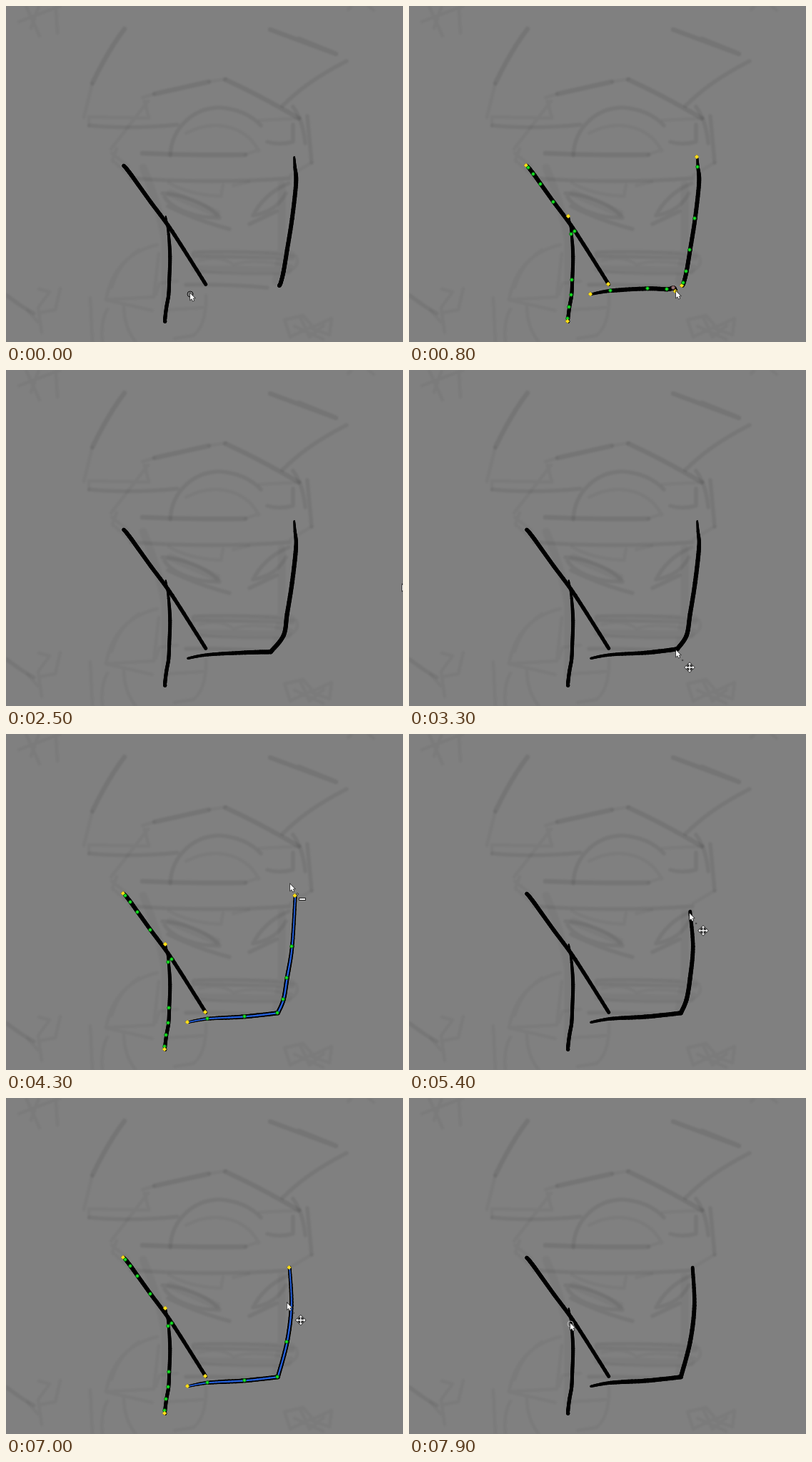
Recreate the animation shown at these times as an HTML page with a canvas. Size 556 by 470 pixels, loop 8000 ms.

```html
<!DOCTYPE html>
<html lang="en">
<head>
<meta charset="utf-8">
<title>Vector line editing</title>
<style>
  html, body { margin: 0; width: 100%; height: 100%; overflow: hidden; background: #808080; }
  svg, canvas { position: absolute; left: 0; top: 0; width: 556px; height: 470px; }
  svg { fill: none; stroke: #000; stroke-linecap: round; stroke-linejoin: round; filter: blur(1.2px); }
  .bold { stroke-width: 6.5; opacity: .085; }
  .mid { stroke-width: 5.5; opacity: .07; }
  .thin { stroke-width: 4.5; opacity: .04; }
  .wide { stroke-width: 11; opacity: .035; }
</style>
</head>
<body>
<svg viewBox="0 0 556 470">
  <g class="bold">
    <path d="M166 32Q143 62 121 108"/>
    <path d="M370 33L462 67M410 46L460 66"/>
    <path d="M307 103Q350 122 410 157"/>
    <path d="M208 123L284 106"/>
    <path d="M191 206Q270 209 335 208"/>
  </g>
  <g class="mid">
    <path d="M477 77Q420 106 387 140"/>
    <path d="M230 209C232 170 262 143 298 142Q335 144 357 167"/>
    <path d="M117 167Q170 173 240 166"/>
    <path d="M402 141Q416 160 419 192M422 154L428 219"/>
    <path d="M366 190Q382 195 402 190V166"/>
    <path d="M175 241Q290 249 397 241"/>
    <path d="M219 262C250 264 285 278 299 296C268 297 234 286 222 267"/>
    <path d="M227 280Q270 301 313 312"/>
    <path d="M396 248Q362 262 346 293Q378 288 392 262M341 305L379 287"/>
    <path d="M252 390Q310 389 366 394"/>
    <path d="M0 404L22 420L39 430"/>
  </g>
  <g class="thin">
    <path d="M121 108L109 156M118 155L200 157M116 155V168"/>
    <path d="M199 133L147 200M194 133L200 156M191 128L208 123M284 106L308 102"/>
    <path d="M252 178Q290 158 325 174Q345 184 354 203M335 208L354 201"/>
    <path d="M148 206L171 224M155 199L149 216L178 241M428 219L398 237M355 160L412 157"/>
    <path d="M228 247Q255 264 301 266L304 250M318 251L340 246"/>
    <path d="M262 345Q335 340 406 350Q414 365 390 374Q320 377 262 370Z"/>
    <path d="M270 356Q300 348 319 362Q345 352 400 364M266 350L402 354"/>
    <path d="M212 334C170 344 148 370 140 411L205 426M186 341Q157 361 148 394M214 346L207 407L140 411"/>
    <path d="M240 385L215 388L210 403M280 405Q281 447 262 461L236 465M225 425L275 422"/>
    <path d="M118 408L121 470M142 424Q132 442 135 470M165 421Q166 450 181 469"/>
    <path d="M46 396L61 400L45 422L50 457M76 395L69 425L48 429M30 426L45 442"/>
    <path d="M390 439L416 433L430 449L456 437L453 460L425 450L398 463ZM412 435L425 463L445 447M404 448L444 466"/>
    <path d="M18 22L76 0M28 0L47 42M46 0L35 31M70 4L72 38M479 5L484 0M507 0L515 6"/>
  </g>
  <g class="wide">
    <path d="M192 226Q215 280 223 330V430"/>
    <path d="M386 250V340L378 385"/>
    <path d="M265 347L400 348M270 368L395 370M230 262L295 290"/>
  </g>
</svg>
<canvas id="stage" width="556" height="470"></canvas>
<script>
const ctx = document.getElementById('stage').getContext('2d');
const LOOP = 8000, STEP = 100;

// Points are [x, y, unmarked]
const diagonal = [[164, 223], [167, 226], [174, 235], [184, 249], [202, 274], [232, 315], [279, 389]];
const upright = [[223, 294], [227, 319], [229, 350, true], [228, 383], [227, 404], [224, 421], [222, 437], [222, 441]];
const sideTop = [[400, 297], [405.5, 247, true], [404, 225], [403, 211]];
const side = [[382, 391], [384, 387], [388, 371], [393, 341], ...sideTop];
const base = [[254, 403], [282, 398], [334, 395]];
const tail = [[361, 396], [370, 394], [373, 399]];

// Spans with visible control points
const editing = [[800, 1100], [1400, 2300], [2700, 3200], [3600, 3700], [4000, 5000], [5700, 6600], [7000, 7400]];

const cursorTrack = [
  [0, 258, 402, 'pen'], [100, 255, 403, 'pen'], [300, 290, 398, 'pen'], [500, 342, 395, 'pen'],
  [700, 373, 399, 'pen'], [800, 374, 399, 'plain'], [1200, 385, 380, 'plain'], [1400, 388, 372, 'cut'],
  [1500, 386, 374, 'cut'], [1700, 362, 400, 'cut'], [1900, 366, 398, 'plain'], [2100, 450, 350, 'plain'],
  [2300, 545, 300, 'plain'], [2600, 560, 300, 'plain'], [2800, 552, 310, 'plain'], [3000, 420, 380, 'plain'],
  [3100, 370, 394, 'move'], [3300, 374, 392, 'move'], [3500, 380, 391, 'move'], [3900, 381, 390, 'minus'],
  [4100, 403, 209, 'minus'], [4300, 398, 210, 'minus'], [4500, 401, 222, 'minus'], [4700, 404, 226, 'move'],
  [5000, 405, 226, 'move'], [5400, 393, 251, 'move'], [5600, 397, 237, 'move'], [5700, 398, 250, 'minus'],
  [5900, 400, 298, 'minus'], [6300, 390, 377, 'minus'], [6500, 389, 372, 'minus'], [6600, 391, 300, 'move'],
  [6900, 393, 295, 'move'], [7300, 396, 262, 'plain'], [7400, 390, 270, 'pen'], [7800, 228, 314, 'pen'],
  [7900, 226, 315, 'pen']
];
const cornerTrack = [[1900, 370, 394], [3100, 370, 394], [3300, 375, 390], [3500, 380, 390]];
const endTrack = [[4200, 404.5, 226], [5000, 404.5, 226], [5400, 393, 248], [5600, 396.5, 237]];
const midTrack = [[5900, 397, 290], [6600, 397, 290], [6900, 399, 290]];

function along(track, t) {
  let i = 0;
  while (i < track.length - 1 && track[i + 1][0] <= t) i++;
  const a = track[i], b = track[i + 1] || a;
  const k = b === a ? 0 : Math.max(0, (t - a[0]) / (b[0] - a[0]));
  return { x: a[1] + (b[1] - a[1]) * k, y: a[2] + (b[2] - a[2]) * k, icon: a[3] };
}
const pointOn = (track, t) => { const p = along(track, t); return [p.x, p.y]; };

function joined(t) {
  const corner = pointOn(cornerTrack, t);
  const pts = [...base, corner, [...corner, true]];
  if (t < 6500) pts.push([388, 371]);
  pts.push([393, 341]);
  if (t < 4200) return [...pts, ...sideTop];
  pts.push(t < 5900 ? [t < 5000 ? 400 : 397, 297] : [...pointOn(midTrack, t), true]);
  pts.push(pointOn(endTrack, t));
  return pts;
}

// Catmull-Rom curve; a doubled point makes a sharp corner
function sample(pts) {
  const out = [];
  for (let i = 0; i < pts.length - 1; i++) {
    const b = pts[i], c = pts[i + 1], a = pts[i - 1] || b, d = pts[i + 2] || c;
    if (b[0] === c[0] && b[1] === c[1]) continue;
    for (let j = 0; j <= 12; j++) {
      const u = j / 12;
      out.push([0, 1].map(n => b[n] + .5 * u * (c[n] - a[n]
        + u * (2 * a[n] - 5 * b[n] + 4 * c[n] - d[n] + u * (3 * (b[n] - c[n]) + d[n] - a[n])))));
    }
  }
  return out;
}

function ink(line, color, from, middle, to) {
  ctx.strokeStyle = color;
  ctx.lineCap = 'round';
  for (let i = 1; i < line.length; i++) {
    const u = i / line.length;
    ctx.lineWidth = u < .25 ? from + (middle - from) * u * 4
      : u > .75 ? middle + (to - middle) * (u - .75) * 4 : middle;
    ctx.beginPath();
    ctx.moveTo(...line[i - 1]);
    ctx.lineTo(...line[i]);
    ctx.stroke();
  }
}

function poly(pts, fill, stroke, width = 1) {
  ctx.beginPath();
  pts.forEach(p => ctx.lineTo(...p));
  ctx.closePath();
  ctx.lineWidth = width;
  ctx.strokeStyle = stroke;
  ctx.stroke();
  ctx.fillStyle = fill;
  ctx.fill();
}

function dot(x, y, r, fill, stroke) {
  ctx.beginPath();
  ctx.arc(x, y, r, 0, 7);
  if (fill) { ctx.fillStyle = fill; ctx.fill(); }
  if (stroke) { ctx.lineWidth = 1; ctx.strokeStyle = stroke; ctx.stroke(); }
}

function marks(pts, cur) {
  const shown = pts.filter(p => !p[2]);
  shown.forEach(([x, y], i) => {
    if (i === 0 || i === shown.length - 1) {
      poly([[x, y - 3], [x + 3, y], [x, y + 3], [x - 3, y]], '#ffe01a', '#6a5a10', .6);
    } else {
      const near = Math.hypot(x - cur.x, y - cur.y) < 7;
      dot(x, y, 2.3, near ? '#a07878' : '#14ee22', near ? '#705050' : '#0a6a10');
    }
  });
}

function arms(x, y, r, w, color, vertical = true) {
  ctx.lineCap = 'butt';
  ctx.lineWidth = w;
  ctx.strokeStyle = color;
  ctx.beginPath();
  ctx.moveTo(x - r, y);
  ctx.lineTo(x + r, y);
  if (vertical) { ctx.moveTo(x, y - r); ctx.lineTo(x, y + r); }
  ctx.stroke();
}

const icons = {
  plain() {},
  pen(t) { dot(0, 1, 4, null, t < 800 ? '#111' : '#b4b4b4'); },
  minus() {
    dot(10, 14, 1.3, '#fff', '#222');
    arms(17, 21, 5, 4, '#222', false);
    arms(17, 21, 4, 2, '#fff', false);
  },
  cut() {
    poly([[4, 18], [8, 14], [8.6, 15]], '#fff', '#222', .8);
    poly([[11, 11], [15, 7], [14, 9]], '#fff', '#222', .8);
    arms(15.5, 20.5, 4.5, 3.4, '#222');
    arms(15.5, 20.5, 3.5, 1.4, '#fff');
  },
  move() {
    dot(9, 14, .8, '#fff', '#333');
    arms(19, 24, 6, 4.5, '#222');
    for (let i = 0; i < 4; i++) {
      ctx.save();
      ctx.translate(19, 24);
      ctx.rotate(i * Math.PI / 2);
      poly([[6.8, 0], [4.2, -2.4], [4.2, 2.4]], '#fff', '#222', 1.4);
      ctx.restore();
    }
    arms(19, 24, 4.5, 1.3, '#fff');
  }
};

function drawCursor(cur, t) {
  ctx.save();
  ctx.translate(cur.x, cur.y);
  icons[cur.icon](t);
  poly([[0, 0], [0, 9], [2.1, 7.3], [3.7, 10.6], [5.2, 9.9], [3.7, 6.8], [6.4, 6.4]], '#fff', '#222', 1.4);
  ctx.restore();
}

function render(t) {
  const cur = along(cursorTrack, t);
  const edit = editing.some(([a, b]) => t >= a && t < b);
  const strokes = [[diagonal, 4.8, 5.6, 5], [upright, 2.2, 5, 5]];
  if (t < 1900) {
    strokes.push([side, 5.2, 5.8, 2.4]);
    if (t >= 100) strokes.push([[...base, ...tail], 3, 5.8, 4.8, true]);
  } else {
    strokes.push([joined(t), 3.2, 6, t < 4200 ? 2.4 : 4.8, true]);
  }

  ctx.clearRect(0, 0, 556, 470);
  for (const [pts, from, middle, to, active] of strokes) {
    let line = sample(pts).map(([x, y]) => [x + .7, y + .3]);
    if (active && t < 700) line = line.filter(p => p[0] <= cur.x);
    ink(line, '#000', from, middle, to);
    if (edit && active && t >= 1400) ink(line, '#2460dc', 1.4, 2.2, 1.6);
  }
  if (t >= 1500 && t < 1900) ink([[388, 372], [cur.x + 3, cur.y - 6]], '#e8e8e8', 1.2, 1.2, 1.2);
  if (edit) strokes.forEach(s => marks(s[0], cur));
  drawCursor(cur, t);
}

const start = performance.now();
function tick() {
  const t = (performance.now() - start) % LOOP;
  render(Math.floor(t / STEP) * STEP);
  requestAnimationFrame(tick);
}
tick();
</script>
</body>
</html>
```
